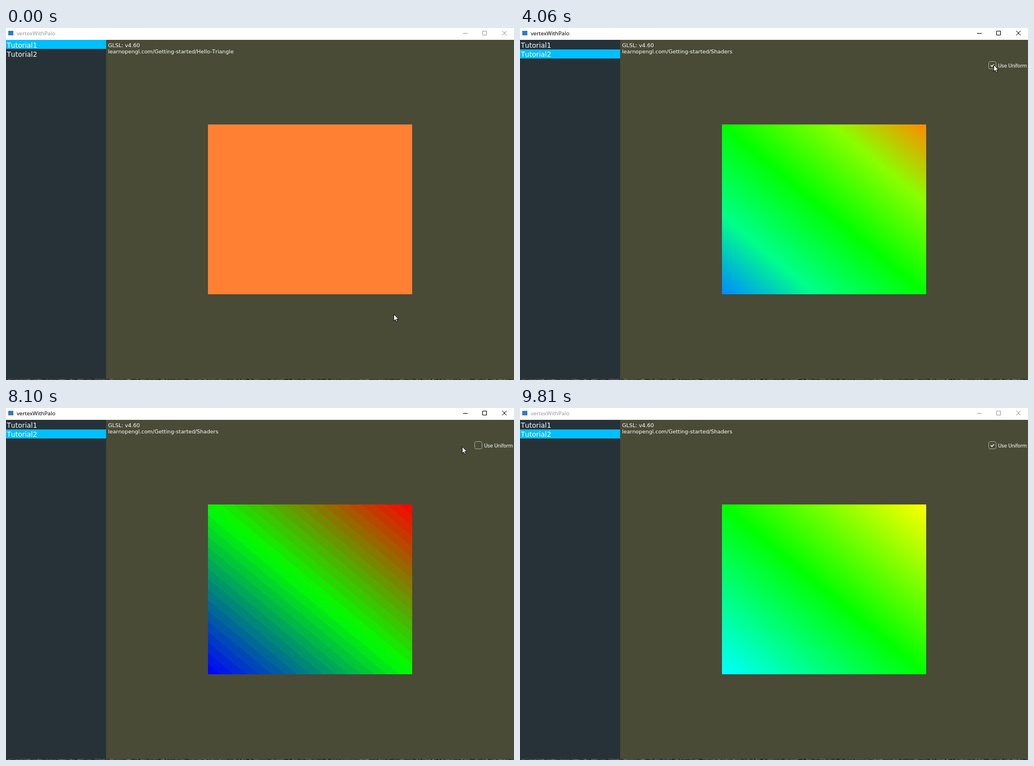
Write an HTML page that moves like this. It is 898 by 624 pixels and loops after 9890 ms.

```html
<!DOCTYPE html>
<html lang="en">
<head>
<meta charset="utf-8">
<title>Shader tutorials</title>
<style>
  html, body { margin: 0; width: 100%; height: 100%; overflow: hidden; background: #fff; }
  svg { display: block; width: 898px; height: 624px; }
  text { font-family: "DejaVu Sans", Verdana, sans-serif; font-kerning: none; fill: #fff; white-space: pre; }
  .info { font-size: 9.37px; }
  .row { font-size: 12px; }
  .crisp { shape-rendering: crispEdges; }
  #title { font: 9.6px "Noto Sans", "Open Sans", sans-serif; }
  #toggle text { font-size: 8.7px; letter-spacing: -.25px; }
</style>
</head>
<body>
<svg viewBox="0 0 898 624" xmlns="http://www.w3.org/2000/svg">
  <defs>
    <linearGradient id="bands" x1="0" y1="1" x2="1" y2="0"></linearGradient>
    <linearGradient id="blend" x1="0" y1="1" x2="1" y2="0"></linearGradient>
  </defs>

  <rect width="898" height="21" fill="#fff"/>
  <rect x="4" y="5" width="9" height="8" fill="#2d7dc1"/>
  <text id="title" x="19" y="13">vertexWithPalo</text>
  <path id="buttons" fill="none" d="M808 9.5h8M842.5 5.5h7v7h-7zM877 5l8 8m0-8l-8 8"/>

  <rect y="21" width="177" height="601" fill="#263238"/>
  <rect id="mark" class="crisp" width="177" height="16" fill="#00bfff"/>
  <text class="row" x="1.5" y="34.5">Tutorial1</text>
  <text class="row" x="1.5" y="51">Tutorial2</text>

  <rect x="177" y="21" width="721" height="601" fill="#494b36"/>
  <text class="info" x="180.5" y="33.5">GLSL: v4.60</text>
  <text class="info" id="link" x="180.5" y="45"></text>
  <rect id="quad" class="crisp" x="357" y="171" width="361" height="301"/>

  <g id="toggle">
    <rect x="828.5" y="59.5" width="13" height="13" rx="3" fill="none" stroke="#a9aa9f"/>
    <path id="tick" d="M832 66l2.2 2.2 3.8-4" fill="none" stroke="#fff" stroke-width="1.5"/>
    <text x="845" y="70">Use Uniform</text>
  </g>

  <g id="strip" class="crisp"></g>
  <path id="cursor" d="M.5 .5V12.3L3.2 9.8 5 13.8 6.9 13 5.1 9.1H8.8Z" fill="#fff" stroke="#000" stroke-width=".9"/>
</svg>

<script>
const LOOP = 9890;
const NS = 'http://www.w3.org/2000/svg';
const $ = id => document.getElementById(id);

function add(parent, tag, attrs) {
  const el = document.createElementNS(NS, tag);
  for (const key in attrs) el.setAttribute(key, attrs[key]);
  return parent.appendChild(el);
}

const within = (t, from, to) => t >= from && t < to;
const clamp = v => Math.max(0, Math.min(1, v));
const ease = k => k * k * (3 - 2 * k);
const show = (el, on) => el.setAttribute('visibility', on ? 'inherit' : 'hidden');

// s runs from -1 (blue corner) through 0 (green diagonal) to 1 (red corner)
function shade(s, boost) {
  const d = Math.abs(s);
  const g = Math.round(255 * clamp(1 - d + boost));
  const side = Math.round(255 * d);
  return s > 0 ? `rgb(${side},${g},0)` : `rgb(0,${g},${side})`;
}

// Stepped gradient for the plain vertex colours
const BANDS = 16;
for (let i = -BANDS; i < BANDS; i++) {
  const fill = shade((i + .5) / BANDS, 0);
  for (const edge of [i, i + 1]) {
    add($('bands'), 'stop', { offset: (edge / BANDS + 1) / 2, 'stop-color': fill });
  }
}

// Smooth gradient with the green channel raised by the uniform
const stops = Array.from({ length: 5 }, () => add($('blend'), 'stop', {}));
function setBlend(boost) {
  [-1, -boost, 0, boost, 1].forEach((s, i) => {
    stops[i].setAttribute('offset', (s + 1) / 2);
    stops[i].setAttribute('stop-color', shade(s, boost));
  });
}

// Sliver of dark desktop below the window
let seed = 7;
const rand = () => (seed = seed * 16807 % 2147483647) / 2147483647;
for (const y of [622, 623]) {
  for (let x = 0; x < 898;) {
    const width = 1 + Math.floor(rand() * 4);
    const v = Math.round(30 + rand() * 75);
    add($('strip'), 'rect', { x, y, width, height: 1, fill: `rgb(${v},${v},${v - 4})` });
    x += width;
  }
}

// Pointer strokes between its resting points
const moves = [
  { from: 60, to: 130, x: 437, y: 330 },
  { from: 290, to: 1130, x: 35, y: 43 },
  { from: 1760, to: 2760, x: 840, y: 66 },
  { from: 3400, to: 4060, x: 837, y: 65 },
  { from: 5000, to: 5850, x: 61, y: 33 },
  { from: 6480, to: 6620, x: 50, y: 43 },
  { from: 7320, to: 8200, x: 834, y: 64 },
  { from: 8330, to: 8700, x: 841, y: 565 },
  { from: 8780, to: 9260, x: 843, y: 625 }
];

// Each stroke sags a little in proportion to its width
function pointer(t) {
  let x = 685, y = 507;
  for (const m of moves) {
    if (t < m.from) break;
    const k = ease(clamp((t - m.from) / (m.to - m.from)));
    const dx = m.x - x;
    x += dx * k;
    y += (m.y - y) * k + Math.abs(dx) * .05 * Math.sin(Math.PI * k);
  }
  return [Math.round(x), Math.round(y)];
}

function draw(t) {
  const active = within(t, 1180, 9400);
  const shaders = within(t, 1290, 6160) || t >= 6920;
  const start = within(t, 3080, 4690) ? 3080 : 8270;
  const checked = t >= 8270 || start === 3080;

  $('title').style.fill = active ? '#000' : '#999';
  $('buttons').setAttribute('stroke', active ? '#000' : '#999');
  $('mark').setAttribute('y', shaders ? 38 : 21);
  $('link').textContent = 'learnopengl.com/Getting-started/' + (shaders ? 'Shaders' : 'Hello-Triangle');
  show($('toggle'), shaders);
  show($('tick'), checked);

  if (checked) {
    const s = (t - start) / 1000;
    setBlend(clamp(.48 * s + .07 * s ** 3));
  }
  $('quad').setAttribute('fill', !shaders ? '#ff8033' : checked ? 'url(#blend)' : 'url(#bands)');
  $('cursor').setAttribute('transform', `translate(${pointer(t)})`);
}

const begin = performance.now();
function tick() {
  draw((performance.now() - begin) % LOOP);
  requestAnimationFrame(tick);
}
tick();
</script>
</body>
</html>
```
